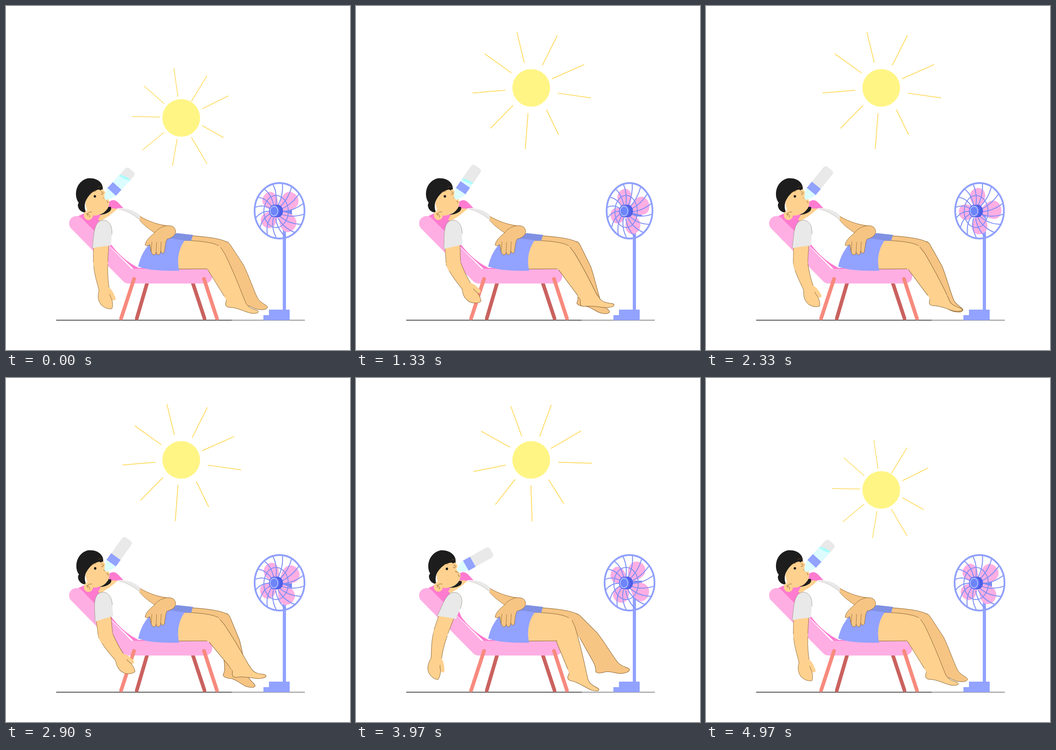
An HTML page with a canvas for the animation above (5.01 s loop, 747 by 750 pixels).

```html
<!DOCTYPE html>
<html lang="en">
<head>
<meta charset="utf-8">
<title>Hot day</title>
<style>
html, body { margin: 0; width: 100%; height: 100%; overflow: hidden; background: #fff; }
canvas { display: block; }
</style>
</head>
<body>
<canvas id="stage" width="747" height="750"></canvas>
<script>
const c = document.getElementById('stage').getContext('2d');
const LOOP = 5010, END = 4970, RAD = Math.PI / 180;
const SKIN = '#ffd18f', SHADE = '#f6c584', LINE = '#8a6535', BLUE = '#92a2ff',
  GREY = '#e9e9e9', PINK = '#ffaee3', HOT = '#ff7bd0', DARK = '#1d1d1d', WATER = '#dcfdff';

// ---------- timing ----------
const ramp = (t, from, length) => {
  const u = Math.min(1, Math.max(0, (t - from) / length));
  return u * u * (3 - 2 * u);
};

// Smooth curve through [time, value] keys, level at both ends.
function curve(keys) {
  const slope = i => i === 0 || i === keys.length - 1 ? 0 :
    (keys[i + 1][1] - keys[i - 1][1]) / (keys[i + 1][0] - keys[i - 1][0]);
  return t => {
    let i = 0;
    while (i < keys.length - 2 && t > keys[i + 1][0]) i++;
    const [t0, a] = keys[i], [t1, b] = keys[i + 1], d = t1 - t0, u = (t - t0) / d;
    const s = u * u * (3 - 2 * u);
    return a + (b - a) * s + d * u * (1 - u) * (slope(i) * (1 - u) - slope(i + 1) * u);
  };
}

const swing = [0, 730, 1030, 1330, 1970, 2330, 2850, 3470, 4000, 4430, END];
const onSwing = (...values) => curve(swing.map((t, i) => [t, values[i]]));
const nearShin = onSwing(0, 5, 7, 5, 0, 5, 8, 3, -9.5, -5, 0);
const nearFoot = onSwing(0, 9, 9, 7, 0, -4, 4, -2, 0, 0, 0);
const farLeg = onSwing(0, -8, -11, -7, 0, -4, -11, 1.2, 12, 7.7, 0);
const shoulder = onSwing(0, 9, 10, 5, -8, 0, 9, -3, -18, -11, 0);
const elbow = onSwing(0, 13, 18, 17, 4, 10, 16, 13, 0, 3, 0);
const bottleTilt = curve([[0, 42.5], [730, 34], [1330, 34.5], [2000, 40.5], [2330, 39],
  [2720, 32], [3470, 53], [4100, 62], [4430, 63], [END, 42.5]]);
const waterLevel = curve([[0, 62], [730, 52], [1330, 46], [2000, 38], [2330, 32],
  [3900, 32], [4430, 40], [END, 62]]);

// ---------- drawing helpers ----------
function shape(d, fill, stroke, width = 1) {
  const path = new Path2D(d);
  if (fill) { c.fillStyle = fill; c.fill(path); }
  if (stroke) { c.strokeStyle = stroke; c.lineWidth = width; c.stroke(path); }
}

function oval(x, y, rx, ry, fill, stroke, width = 1, turn = 0) {
  c.beginPath();
  c.ellipse(x, y, rx, ry, turn, 0, 7);
  if (fill) { c.fillStyle = fill; c.fill(); }
  if (stroke) { c.strokeStyle = stroke; c.lineWidth = width; c.stroke(); }
}

// Fills a limb and inks only its open outline.
function limb(outline, closing, fill, width = 1) {
  shape(outline + closing + 'Z', fill);
  shape(outline, null, LINE, width);
}

function turned(x, y, degrees, draw) {
  c.save();
  c.translate(x, y);
  c.rotate(degrees * RAD);
  c.translate(-x, -y);
  draw();
  c.restore();
}

// ---------- sun ----------
const rays = [
  [-7, -46, -16, -108], [22, -36, 56, -92], [46, -20, 102, -48],
  [46, 17, 92, 43], [22, 42, 56, 100], [-9, 46, -19, 105],
  [-37, 31, -84, 70], [-46, -2, -107, -3], [-37, -31, -81, -70]
];

function sun(t) {
  const rise = ramp(t, 0, 1110) - ramp(t, 3951, 1019);
  const grow = ramp(t, 0, 750) - ramp(t, 4106, 864);
  const spin = ramp(t, 260, 1080) - ramp(t, 3670, 1100);
  c.save();
  c.translate(380.5, 244 - 65.5 * rise);
  oval(0, 0, 41, 41, '#fff585');
  c.rotate(34.8 * spin * RAD);
  c.scale(1 + 0.17 * grow, 1 + 0.17 * grow);
  for (const [x, y, u, v] of rays) shape(`M${x} ${y}L${u} ${v}`, null, '#ffda5c', 1.5);
  c.restore();
}

// ---------- fan ----------
function fan(t) {
  const turn = (1 + Math.cos((t - 1530) / LOOP * 2 * Math.PI)) / 2;
  const rx = 54.2 - 4.8 * turn ** 5, ry = 60.5;

  shape('M601 452H608V664H601ZM571 662H616V685H559V674H571Z', BLUE);
  shape('M598 442H621V459H598Z', '#758af5');

  const angle = 50 - 29 * 90 * t / END;
  c.save();
  c.translate(592, 447);
  c.scale(rx / 58, 1);
  for (let i = 0; i < 4; i++) {
    const a = angle + 90 * i, size = 0.95 + 0.07 * Math.sin(a * RAD);
    c.save();
    c.rotate(a * RAD);
    c.scale(size, size);
    shape('M0 0C-10 -14 -26 -26 -17 -44C-8 -57 13 -56 18 -43C24 -28 10 -14 0 0', PINK);
    c.restore();
  }
  c.restore();

  for (let i = 0; i < 16; i++) {
    const a = (i + 0.3) * Math.PI / 8;
    const at = (x, y, w, h, b) => `${x + w * Math.cos(b)} ${y + h * Math.sin(b)}`;
    shape(`M${at(586, 448, 13, 15, a + 0.3)}Q${at(589, 447, rx * 0.65, 40, a + 0.28)} ${at(594, 446.5, rx, ry, a)}`,
      null, '#7d8ff5', 2);
  }
  oval(586.5, 448, rx * 0.49, 35, null, '#7d8ff5', 2);
  oval(594, 446.5, rx, ry, null, '#90a0fc', 3.8);
  oval(589, 447, 12.5, 14, '#4d5fe8');
  oval(583, 447, 12, 14, '#5a6df0');
  oval(582, 447, 8.5, 10.5, '#6d84fb', '#b3c4ff', 1.8);
}

// ---------- chair ----------
function chair() {
  const leg = (d, color) => shape(d, null, color, 8);
  c.save();
  c.lineCap = c.lineJoin = 'round';
  leg('M307 602L284 681M405 602L431 681', '#ca625f');
  shape('M157 458L229 424Q237 421 245 430L310 500V573H277Z', HOT);
  shape('M153 474L266 589H432', null, PINK, 32);
  leg('M278 595L250 681M430 595L458 681', '#f78a7d');
  c.restore();
}

// ---------- person ----------
function torso() {
  shape('M200 466L208 452L226 441L246 442Q228 462 205 469Z', SKIN);
  shape('M203 470Q226 458 243 441Q268 438 291 457L330 500L300 571H288C270 562 248 547 229 521L212 482Z', '#fff');
  shape('M243 442Q270 438 292 457L290 467Q268 448 243 442Z', GREY);
  shape('M291 466Q270 448 246 443', null, '#c9c1b4', 0.7);
}

function legs(t) {
  turned(478, 520, -farLeg(t), () => {
    limb('M478 513Q484 515 488 522L516 565C528 590 538 620 546 636C552 648 568 652 568 657Q566 663 552 662C540 662 530 652 516 651Q497 653 495 646Q498 638 494 624L476 566',
      'L455 545L456 511', SHADE);
  });
  shape('M400 500Q450 503 480 514L485 530L455 560L400 520Z', SHADE);
  shape('M404 501C430 503 466 506 480 515', null, LINE);

  turned(456, 546, -nearShin(t), () => {
    turned(496, 640, -nearFoot(t), () => {
      limb('M474 633Q481 639 477 647Q475 656 485 657C502 657 518 667 533 670Q547 671 548 667C549 661 529 663 521 648L516 636',
        'L495 620', SKIN);
    });
    limb('M516 636C506 610 493 577 475 540L466 526', 'L461 523L425 537L437 573L474 633L480 644L512 646', SKIN);
    shape('M437 573L474 633', null, LINE);
  });
  shape('M380 510C420 511 450 516 462 523Q472 536 468 550L439 574H370Z', SKIN);
  shape('M387 511C420 512 450 515 462 523M375 573.5L437 573', null, LINE);
}

function shorts() {
  shape('M350 510L370 495L406 499L402 512Z', '#8091e3');
  shape('M287 568C291 548 302 525 320 511L352 506L388 511C374 530 371 555 376 577C340 578 308 576 287 568Z', BLUE);
}

function farArm() {
  shape('M291 458C312 471 335 477 357 479L345 498L323 495C310 486 298 478 290 466Z', SHADE);
  shape('M291 459C312 471 333 477 348 479M290 467C300 479 312 487 323 495', null, LINE, 0.8);
  shape('M323 494C334 480 354 475 364 482C373 491 368 504 350 508C346 514 346 524 344 536Q339 543 336 534L335 540Q329 546 326 537L325 541Q318 546 315 535L312 520Q306 525 302 521C304 510 313 503 323 494Z',
    SHADE, LINE, 0.9);
  shape('M336 534L337 514M326 537L327 515M315 535L317 514', null, LINE, 0.8);
}

function nearArm(t) {
  turned(211, 489, -shoulder(t), () => {
    turned(206, 562, -elbow(t), () => {
      shape('M190 552C190 580 197 600 202 620C199 632 199 642 207 652Q218 662 230 660Q233 653 230 640Q238 645 238 637Q231 618 224 614C220 590 221 570 221 552Q206 545 190 552Z', SKIN);
      shape('M190 556C190 580 197 600 202 620C199 632 199 642 207 652Q218 662 230 660Q233 653 230 640Q226 633 225 628M224 614C220 590 221 570 221 562', null, LINE, 0.9);
    });
    shape('M190 524L189.500 556Q190 570 194 577L219 574Q221 565 221 552L223 521Z', SKIN);
    shape('M190 526L189.500 558M223 522L221 558', null, LINE, 0.8);
    shape('M187 528C191 506 189 481 202 470C214 462 229 470 230 490L228 522Q208 524 187 528Z', GREY);
    shape('M187 528C191 506 189 481 202 470C214 462 229 470 230 490V498', null, '#998f86', 0.8);
  });
}

function head(t, lean) {
  turned(185, 455, 6.3 * lean, () => {
    shape('M216 438L228 438Q230 446 222 450Q214 455 203 455Z', DARK);
    shape('M172 430C178 405 194 396 209 395L212 402Q219 407 213 412L217 418L223 422Q226 431 221 441Q213 453 202 455Q190 460 178 452Z', SKIN);
    shape('M158 429C147 415 150 384 176 376C200 373 212 388 210 400C194 398 179 410 172 428Q169 440 174 450C163 451 156 442 156 434Q156 431 158 429Z', DARK);
    oval(179, 456, 10, 10.5, SKIN);
    shape('M187 449Q175 448 177 458M174 453Q183 453 181 461', null, LINE, 0.9);
    shape('M184 409Q188 403 195 404M199 396Q203 392 208 394', null, '#6a4a20', 0.9);
    if (t > 3330 && t < 3600) {
      shape('M189 414Q193 418 197 414M202 399Q205 403 209 399', null, DARK, 1.3);
    } else {
      oval(193, 415, 2.6, 2.8, DARK);
      oval(205, 399, 2.4, 2.7, DARK);
    }
    shape('M206 405Q213 406 210 410Q208 412 206 410M211 418Q214 420 219 420M218 425Q222 426 221 430', null, LINE);
  });
}

// The bottle is drawn along +x, starting at the mouth.
function bottle(t, lean) {
  const tilt = bottleTilt(t), level = waterLevel(t);
  c.save();
  c.translate(216 + 5 * lean, 420 - lean);
  c.rotate((tilt - 90) * RAD);
  shape('M18 -12.500H77Q84 -12 84 -6V6Q84 12 77 12.500H18Z', GREY);
  if (level > 38) {
    const skew = 12.5 * Math.tan((tilt - 25) * RAD);
    shape(`M18 -12.500H${level - skew}L${level + skew} 12.500H18Z`, WATER);
    c.save();
    c.beginPath();
    c.rect(18, -12.5, 66, 25);
    c.clip();
    oval(level, 0, 3, 13, '#aafdfa', null, 1, (25 - tilt) * RAD);
    c.restore();
  }
  shape('M-1 -4H1L10 -9.500L20 -12.500V12.500L10 9.500L1 4H-1Z', WATER);
  shape('M20 -12.500H37.500V12.500H20Z', BLUE);
  c.restore();
}

function draw(t) {
  c.clearRect(0, 0, 747, 750);
  const lean = ramp(t, 2700, 800) - ramp(t, 4450, 500);
  sun(t);
  shape('M109 685H490', null, '#222', 1.5);
  shape('M490 685H649', null, '#333', 1);
  fan(t);
  chair();
  torso();
  legs(t);
  shorts();
  farArm();
  head(t, lean);
  bottle(t, lean);
  nearArm(t);
}

const start = performance.now();
function frame() {
  draw(Math.min(END, (performance.now() - start) % LOOP));
  requestAnimationFrame(frame);
}
frame();
</script>
</body>
</html>
```
